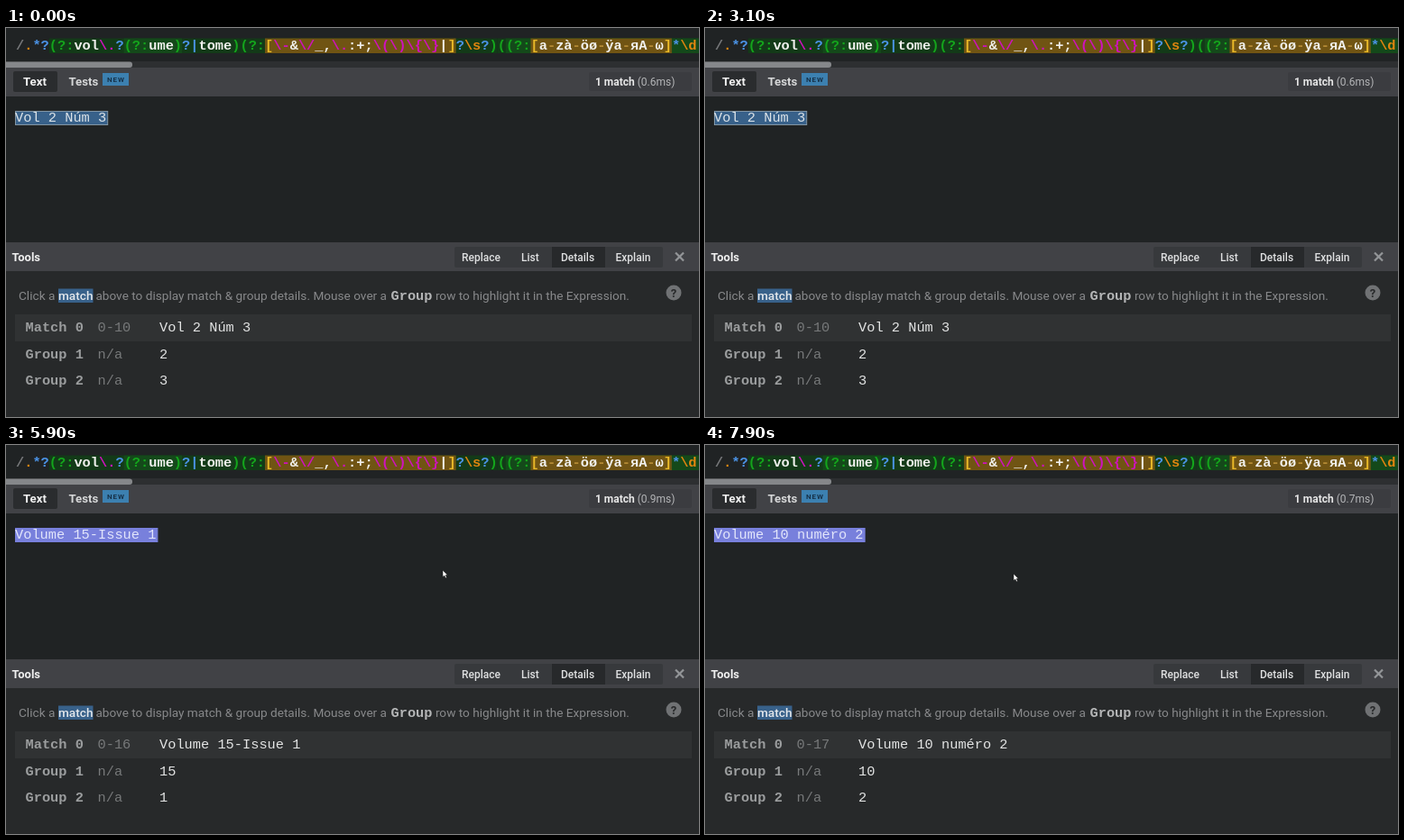
An HTML page for the animation above (8000 ms loop, 768 by 432 pixels).

```html
<!DOCTYPE html>
<html lang="en">
<head>
<meta charset="utf-8">
<title>Regex tester</title>
<style>
  html, body { margin: 0; width: 100%; height: 100%; overflow: hidden; background: #202324; }
  svg { display: block; width: 100vw; height: 100vh; }
  text { font-family: Roboto, sans-serif; white-space: pre; }
  .mono { font-family: "Liberation Mono", monospace; font-size: 15.33px; }
  .bold { font-weight: 700; }
  .med { font-weight: 500; }
</style>
</head>
<body>
<svg id="stage" viewBox="0 0 768 432"></svg>
<script>
const LOOP = 8000, CELL = 9.2, EXPR_X = 11, TEXT_X = 10;
const stage = document.getElementById('stage');

function add(tag, attrs, content, parent = stage) {
  const el = document.createElementNS('http://www.w3.org/2000/svg', tag);
  for (const key in attrs) el.setAttribute(key, attrs[key]);
  if (content !== undefined) el.textContent = content;
  return parent.appendChild(el);
}
const box = (x, y, width, height, fill, rx = 0) => add('rect', { x, y, width, height, fill, rx });
const label = (x, y, size, fill, str, cls = '') =>
  add('text', { x, y, 'font-size': size, fill, class: cls }, str);
const mono = (x, y, fill, str, cls = '') => add('text', { x, y, fill, class: 'mono ' + cls }, str);
const show = (el, on) => el.setAttribute('visibility', on ? 'visible' : 'hidden');

// Panels
box(0, 0, 768, 432, '#202324');
box(0, 37, 768, 7, '#2d2f31');
box(-4, 37.5, 144, 6.5, '#85878a', 3);
box(0, 44, 768, 32, '#414246');
box(0, 238, 768, 32, '#414246');
box(0, 270, 768, 162, '#27292a');

// Expression: group and set backgrounds are measured in character cells
const cells = (from, to, fill) =>
  box(EXPR_X + from * CELL, 11.5, (to - from) * CELL, 16.5, fill);
cells(4, 27, '#133a18');
cells(13, 20, '#14491a');
cells(27, 58, '#133a18');
cells(58, 83, '#133a18');
cells(59, 83, '#14491a');
cells(30, 53, '#705413');
cells(62, 79, '#705413');

const INK = {
  d: '#77797b', o: '#e0850f', b: '#4b93e6', g: '#14a51c',
  w: '#f1f1ee', m: '#cf12bd', y: '#e9b928', r: '#b48a35'
};
const tokens = [
  ['d', '/'], ['o', '.'], ['b', '*?'], ['g', '(?:'], ['w', 'vol'], ['m', '\\.'], ['b', '?'],
  ['g', '(?:'], ['w', 'ume'], ['g', ')'], ['b', '?|'], ['w', 'tome'], ['g', ')(?:'],
  ['y', '['], ['m', '\\-'], ['w', '&'], ['m', '\\/'], ['w', '_,'], ['m', '\\.'], ['w', ':+;'],
  ['m', '\\(\\)\\{\\}'], ['w', '|'], ['y', ']'], ['b', '?'], ['o', '\\s'], ['b', '?'],
  ['g', ')((?:'], ['y', '[']
];
for (const range of ['a-z', 'à-ö', 'ø-ÿ', 'а-я', 'Α-ω'])
  tokens.push(['w', range[0]], ['r', '-'], ['w', range[2]]);
tokens.push(['y', ']'], ['b', '*'], ['o', '\\d']);
const expr = mono(EXPR_X, 24, '#fff', '', 'bold');
for (const [ink, str] of tokens) add('tspan', { fill: INK[ink] }, str, expr);

// Text bar
box(8, 48, 49, 23, '#2a2c2e', 2);
label(19, 64, 13.2, '#f0f0f0', 'Text', 'bold');
label(69.5, 64, 13.2, '#d6d7d8', 'Tests', 'bold');
box(107, 50, 29, 14, '#3c80b0');
add('text', { x: 112, y: 60.3, 'font-size': 8, fill: '#17324a', class: 'bold', 'letter-spacing': 0.9 }, 'NEW');
box(646, 49, 114, 21, '#3b3c40', 2);
const status = label(653, 64, 12, '#e6e6e6', '');
add('tspan', { class: 'bold' }, '1 match', status);
const timing = add('tspan', { fill: '#b4b5b7' }, '', status);

// Tools bar
label(6.5, 259, 13, '#f0f0f0', 'Tools', 'bold');
box(497, 243, 231, 23, '#37393c', 2);
box(605, 243, 59, 23, '#27292b');
[[505, 'Replace'], [571, 'List'], [615, 'Details'], [675.5, 'Explain']]
  .forEach(([x, str]) => label(x, 258.5, 12, '#dfe0e1', str, 'med'));
add('path', { d: 'M742 249.5l9 9m0-9l-9 9', stroke: '#939598', 'stroke-width': 2.2 });

// Hint line
const HINT = 13.63, GREY = '#88898b';
box(58, 289.5, 38.5, 15.5, '#38618a');
label(14, 302, HINT, GREY, 'Click a ');
label(58, 302, HINT, '#e4e8ec', 'match', 'med');
label(96, 302, HINT, GREY, ' above to display match & group details. Mouse over a ');
mono(426.5, 302, '#b4b5b6', 'Group', 'bold');
label(472.5, 302, HINT, GREY, ' row to highlight it in the Expression.');
add('circle', { cx: 740, cy: 294, r: 8.5, fill: '#707274' });
add('text', { x: 740, y: 298.5, 'font-size': 13, fill: '#27292a', class: 'bold', 'text-anchor': 'middle' }, '?');

// Detail rows
box(10, 318, 750, 30, '#303233');
const rows = [['Match 0', 337], ['Group 1', 367], ['Group 2', 396]].map(([name, y]) => {
  mono(21.5, y, '#9b9d9e', name, 'bold');
  return { span: mono(101.5, y, '#77797a', 'n/a'), value: mono(170, y, '#e3e4e4', '') };
});

// Editor
const mark = add('rect', { x: TEXT_X + 0.5, y: 92.5, height: 15 });
const input = mono(TEXT_X, 104, '#dce3e8', '');
const caret = box(0, 92, 1.4, 16, '#f2f4f5');
const pointer = add('path', {
  d: 'M0 0V7.6L1.8 6L3.1 8.8L4.4 8.2L3.2 5.5H5.4Z',
  fill: '#fff', stroke: '#111', 'stroke-width': 0.5
});

const entries = [
  { at: 0, text: 'Vol 2 Núm 3', groups: ['2', '3'], ms: '0.6' },
  { at: 4300, text: 'Volume 15-Issue 1', groups: ['15', '1'], ms: '0.9' },
  { at: 6300, text: 'Volume 10 numéro 2', groups: ['10', '2'], ms: '0.7' }
];
// Pointer passes: visible span, select time, path
const passes = [
  { from: 3500, to: 4300, select: 3800, start: [400, 128], end: [430, 142] },
  { from: 5700, to: 6300, select: 5800, start: [470, 134], end: [484, 139] },
  { from: 7500, to: 8000, select: 7700, start: [366, 134], end: [342, 143] }
];

function render(t) {
  const entry = entries.filter(e => t >= e.at).pop();
  const pass = passes.find(p => t >= p.from && t < p.to);
  const selected = !!pass && t >= pass.select;
  const width = entry.text.length * CELL;

  input.textContent = entry.text;
  input.setAttribute('fill', selected ? '#e2e5fb' : '#dce3e8');
  mark.setAttribute('width', width + 1);
  mark.setAttribute('fill', selected ? '#7880dc' : '#38618a');
  mark.setAttribute('stroke', selected ? '#7880dc' : '#8295a3');
  timing.textContent = ` (${entry.ms}ms)`;
  rows[0].span.textContent = '0-' + (entry.text.length - 1);
  [entry.text, ...entry.groups].forEach((str, i) => { rows[i].value.textContent = str; });

  caret.setAttribute('x', TEXT_X + width + 0.6);
  show(caret, entry.at > 0 && !selected && (t - entry.at) % 1000 < 500);

  show(pointer, !!pass);
  if (pass) {
    const k = 1 - (1 - Math.min(1, (t - pass.from) / 200)) ** 3;
    const [x, y] = pass.start.map((v, i) => v + (pass.end[i] - v) * k);
    pointer.setAttribute('transform', `translate(${x} ${y})`);
  }
}

const origin = performance.now();
function tick() {
  render((performance.now() - origin) % LOOP);
  requestAnimationFrame(tick);
}
tick();
</script>
</body>
</html>
```
